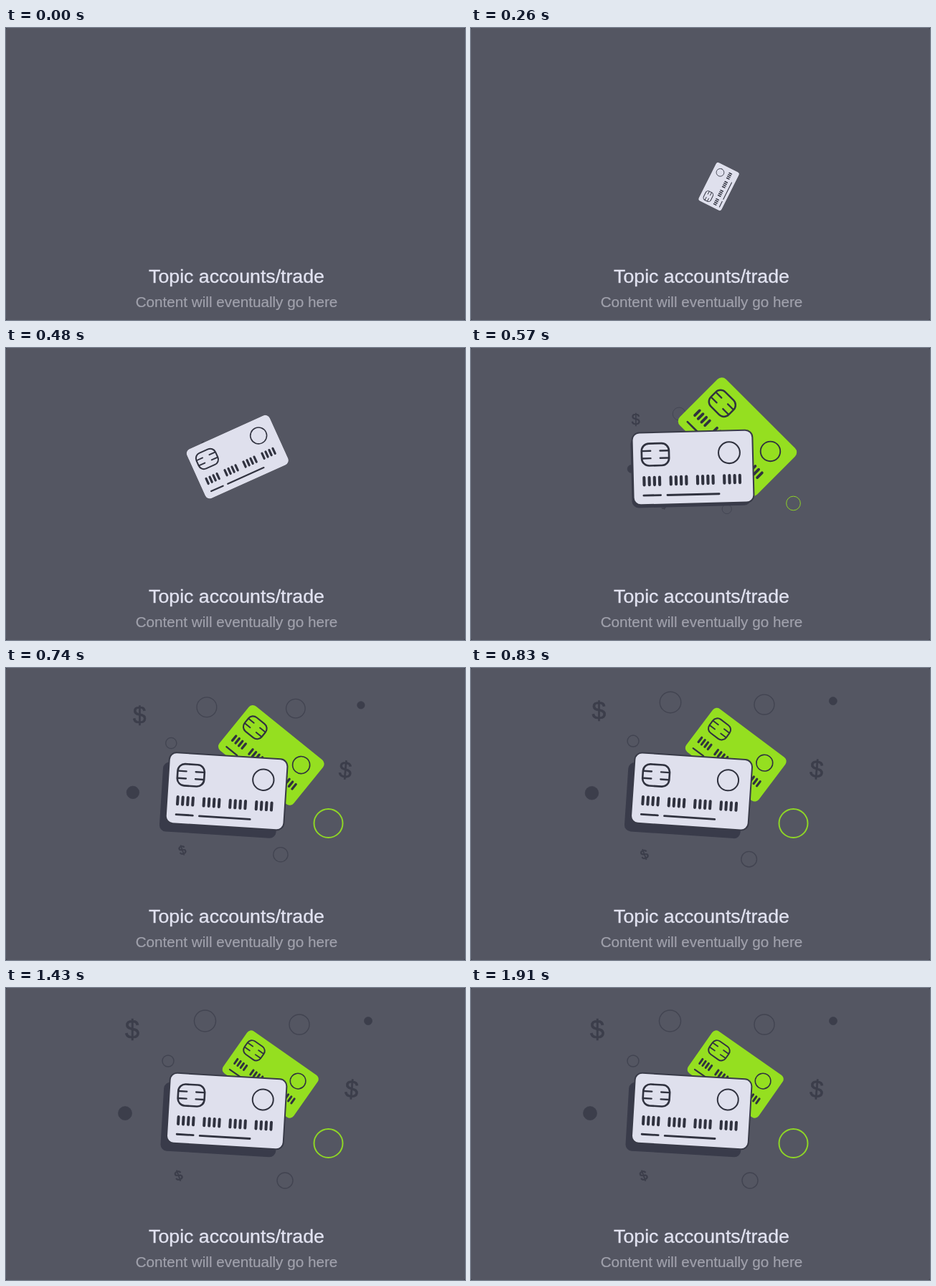
An HTML page for the animation above (1.95 s loop, 640x408 px).

```html
<!DOCTYPE html>
<html lang="en">
<head>
<meta charset="utf-8">
<title>Topic cards</title>
<style>
  html, body { margin: 0; width: 100%; height: 100%; overflow: hidden; background: #3d3f4a; }
  svg { display: block; width: 100%; height: 100%; }
  text { font-family: "Liberation Sans", Arial, sans-serif; text-anchor: middle; }
  .ink { fill: none; stroke: #30323f; stroke-linecap: round; }
  .dim { fill: none; stroke: #424451; stroke-width: 1.4; }
  .dark { fill: #3c3e4b; stroke: #3c3e4b; stroke-width: .7; }
  .title { font-size: 26.7px; fill: #e2e3f1; stroke: #e2e3f1; stroke-width: .35; }
  .note { font-size: 20.7px; fill: #a0a1ac; stroke: #a0a1ac; stroke-width: .2; }
</style>
</head>
<body>
<svg viewBox="0 0 640 408">
  <defs>
    <rect id="plate" x="-80.5" y="-48" width="161" height="96" rx="9"/>
    <g id="print" class="ink">
      <rect x="-69" y="-34" width="37" height="30" rx="10" stroke-width="2.6"/>
      <path d="M-68-24h11M-68-14h11M-33-24h-11M-33-14h-11" stroke-width="2.4"/>
      <circle cx="49.5" cy="-19" r="14.5" stroke-width="2"/>
      <path id="bars" stroke-width="4"/>
      <path d="M-67.5 36.3h23M-35.4 36.5h70" stroke-width="2.8"/>
    </g>
  </defs>
  <rect width="640" height="408" rx="3" fill="#545662"/>
  <g id="symbols"></g>
  <g id="green"><use href="#plate" fill="#95df20"/><use href="#print"/></g>
  <use id="shadow" href="#plate" fill="#393b4a"/>
  <g id="white">
    <use id="rim" href="#plate" stroke="#393b48"/>
    <use href="#plate" fill="#dfe0ed"/><use href="#print"/>
  </g>
  <circle id="badge" r="20" fill="none" stroke="#8fd626" stroke-width="2"/>
  <text class="title" x="321.5" y="355.5">Topic accounts/trade</text>
  <text class="note" x="321.5" y="390">Content will eventually go here</text>
</svg>
<script>
const LOOP = 1950;
const LAND = 570; // the white card has landed, everything settles from here
const $ = id => document.getElementById(id);
const span = (t, from, to) => Math.min(1, Math.max(0, (t - from) / (to - from)));
const mix = (a, b, k) => a + (b - a) * k;
const easeOut = (u, power) => 1 - (1 - u) ** power;
const backOut = u => 1 + 2.7 * (u - 1) ** 3 + 1.7 * (u - 1) ** 2;
const place = (el, x, y, scale, angle = 0) =>
  el.setAttribute('transform', `translate(${x} ${y}) rotate(${angle}) scale(${scale})`);

// Four groups of four digit bars
let bars = '';
for (let i = 0; i < 16; i++) bars += `M${-66.5 + 36.2 * (i >> 2) + 7 * (i % 4)} 12v10`;
$('bars').setAttribute('d', bars);

const dollar = size => `<text class="dark" font-size="${size}" y="${size * .35}">$</text>`;
const ring = r => `<circle class="dim" r="${r}"/>`;
const dot = r => `<circle class="dark" r="${r}"/>`;

const symbols = [];
function addSymbol(shape, x, y, angle = 0) {
  const el = document.createElementNS('http://www.w3.org/2000/svg', 'g');
  el.innerHTML = shape;
  $('symbols').append(el);
  symbols.push({ el, x, y, angle, late: x > 400 || shape === ring(8) });
}
addSymbol(dollar(36), 176, 58);
addSymbol(dollar(34), 482, 141, 5);
addSymbol(dollar(19), 240.5, 262, -20);
addSymbol(ring(15), 277.5, 46);
addSymbol(ring(14), 409, 51);
addSymbol(ring(11), 389, 269);
addSymbol(ring(8), 226, 102);
addSymbol(dot(9.5), 166, 175);
addSymbol(dot(5.5), 505, 46);

// Symbols grow while flying out from behind the cards
function drawSymbols(t) {
  for (const { el, x, y, angle, late } of symbols) {
    const k = easeOut(late ? span(t, 540, 860) : span(t, 430, 970), 3);
    place(el, mix(309, x, k), mix(160, y, k), k, angle);
  }
}

// Spins up in a hop, then rocks back while its shadow drops
function drawWhite(t, shrink, rock) {
  const u = span(t, 40, LAND);
  const grow = .865 * u + .135 * u ** 6;
  const x = mix(366, 309.5, grow) - 1.8 * rock;
  const y = mix(261, 167, grow) - 37.5 * Math.sin(Math.PI * grow ** 3) + 5 * rock;
  const scale = grow * mix(1.03, 1, shrink);
  const angle = mix(-98.5, -1.5, grow) + 4.9 * rock;
  const drop = span(t, 480, LAND);
  place($('white'), x, y, scale, angle);
  place($('shadow'), x - 3 * drop - 6.5 * rock, y + 5 * drop + 7 * rock, scale, angle);
  $('rim').setAttribute('stroke-width', 4 * drop);
}

// Pops out from behind the white card, then shrinks and turns back
function drawGreen(t, shrink) {
  const pop = span(t, 450, LAND);
  place($('green'),
    mix(325, 371.5, pop) - 2.8 * shrink,
    mix(155, 124, pop) - 3.5 * shrink,
    pop * mix(.95, .746, shrink),
    mix(80, 45, pop) - 10 * shrink);
}

function draw(t) {
  const shrink = easeOut(span(t, LAND, 1040), 2);
  const rock = backOut(span(t, LAND, 970));
  drawSymbols(t);
  drawGreen(t, shrink);
  drawWhite(t, shrink, rock);
  place($('badge'), 449.5, 217, span(t, 490, 655));
}

const begin = performance.now();
function tick() {
  draw((performance.now() - begin) % LOOP);
  requestAnimationFrame(tick);
}
tick();
</script>
</body>
</html>
```
